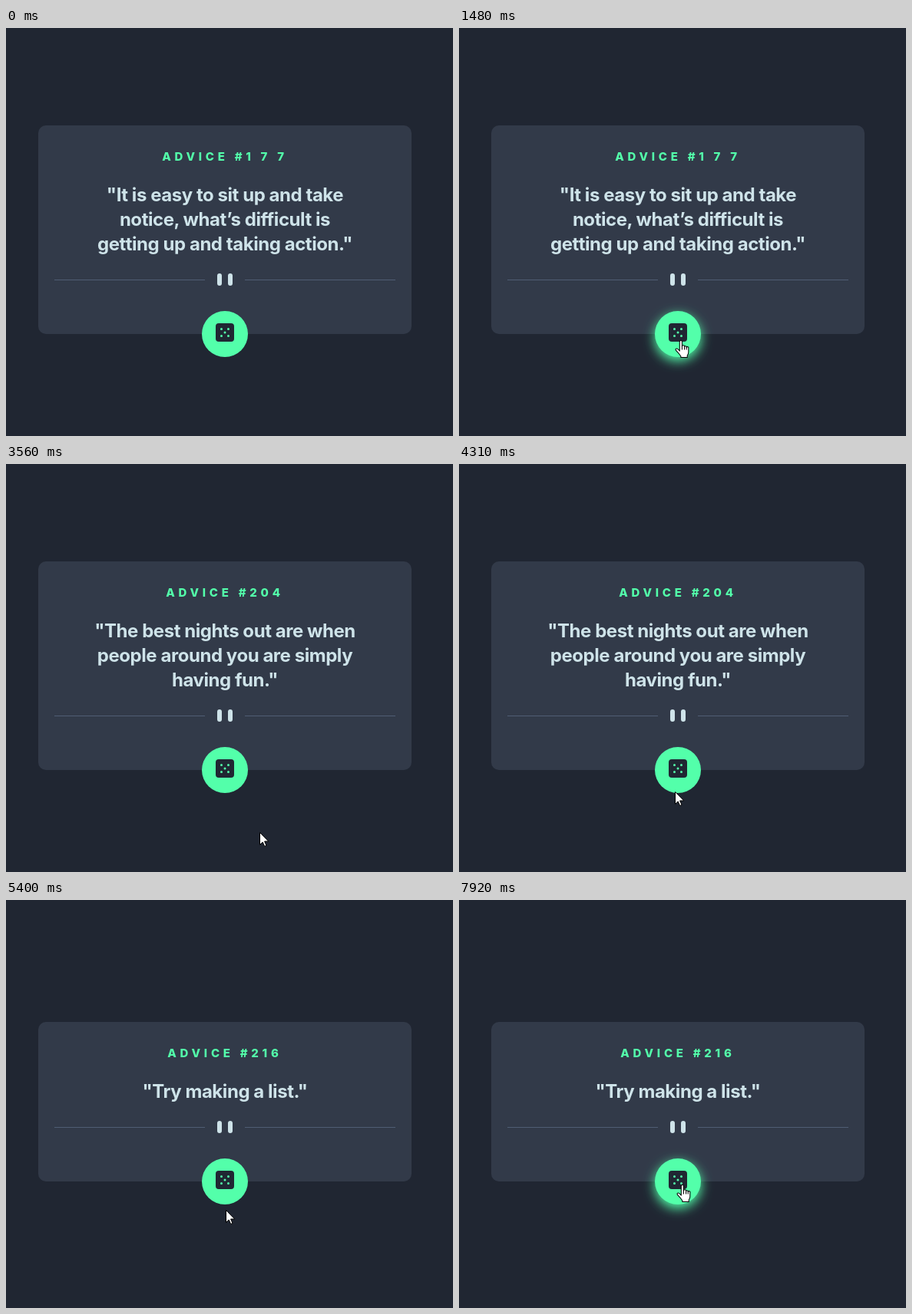
An HTML page for the animation above (8000 ms loop, 582 by 532 pixels).

```html
<!DOCTYPE html>
<html lang="en">
<head>
<meta charset="utf-8">
<title>Advice card</title>
<style>
  html, body { margin: 0; width: 100%; height: 100%; overflow: hidden; background: #202632; }
  svg { display: block; width: 582px; height: 532px; }
  text { font-family: Inter, sans-serif; text-anchor: middle; }
  #title { font-size: 15px; font-weight: 800; letter-spacing: 4.75px; fill: #53ffaa; }
  .quote { font-size: 24px; font-weight: 700; letter-spacing: -0.45px; fill: #cee3e9; }
  .cursor { fill: #fff; stroke: #000; stroke-linejoin: round; }
</style>
</head>
<body>
<svg viewBox="0 0 582 532">
  <defs>
    <filter id="blur" x="-50%" y="-50%" width="200%" height="200%">
      <feGaussianBlur stdDeviation="7.5"/>
    </filter>
  </defs>
  <rect width="582" height="532" fill="#202632"/>
  <rect id="card" x="42" width="486" rx="10" fill="#323a49"/>
  <g id="head">
    <text id="title" x="285" y="46"></text>
    <text class="quote" x="285" y="99"></text>
    <text class="quote" x="285" y="131"></text>
    <text class="quote" x="285" y="163"></text>
  </g>
  <g id="foot">
    <path d="M-222-70.5H-26M26-70.5H222" stroke="#4f5d74"/>
    <path d="M-7-76v10M7-76v10" stroke="#cee3e9" stroke-width="6" stroke-linecap="round"/>
    <circle id="glow" cy="5" r="30" fill="#53ffaa" filter="url(#blur)"/>
    <circle r="30" fill="#53ffaa"/>
    <rect x="-12" y="-14" width="24" height="24" rx="4" fill="#202733"/>
    <path d="M-4.5-6.5h0m9 0h0m-4.5 4.5h0m-4.5 4.5h0m9 0h0" stroke="#53ffaa" stroke-width="3" stroke-linecap="round"/>
  </g>
  <g id="pointer">
    <path id="arrow" class="cursor" transform="translate(-1)" d="M.5 .5V16.5L4.2 13 6.7 18.5 9 17.5 6.6 12H11.7Z"/>
    <g id="hand" class="cursor" transform="translate(-6.5) scale(1.05)">
      <path d="M5.5 13.5V2A1.5 1.5 0 0 1 8.5 2V7.5A1.5 1.3 0 0 1 11.5 8A1.4 1.2 0 0 1 14 9A1.3 1.2 0 0 1 16.5 10V15Q16.5 17 15 19V21.5H7V20Q5.5 18 4 16L1 12.8Q0 11.3 1.2 10.6Q2.5 10 4 11.7Z"/>
      <path d="M8.5 7V12M11.5 8V12M14 9V12" fill="none"/>
    </g>
    <circle id="click" r="12" fill="#ff0" fill-opacity=".47"/>
  </g>
</svg>
<script>
  const LOOP = 8000, STEP = 68;
  const $ = id => document.getElementById(id);
  const quoteLines = document.querySelectorAll('.quote');

  const advice = [
    { at: 0, no: '1 7 7', lines: ['"It is easy to sit up and take', 'notice, what’s difficult is', 'getting up and taking action."'] },
    { at: 2160, no: '204', lines: ['"The best nights out are when', 'people around you are simply', 'having fun."'] },
    { at: 5400, no: '216', lines: ['"Try making a list."'] }
  ];

  // Pointer moves in straight lines, sampled every STEP ms
  const entry = { x: 466, y: 538 };
  const moves = [
    { start: 120, end: 890, x: 288, y: 407 },
    { start: 2760, end: 2760, x: 297, y: 419 },
    { start: 2830, end: 2970, x: 327, y: 502 },
    { start: 3290, end: 3560, x: 332, y: 475 },
    { start: 3760, end: 4310, x: 282, y: 427 },
    { start: 4380, end: 4650, x: 287, y: 404 },
    { start: 5930, end: 6560, x: 325, y: 467 },
    { start: 7160, end: 7920, x: 290, y: 371 }
  ];
  const clicks = [{ start: 1350, end: 1480 }, { start: 5120, end: 5180 }];

  const show = (el, on) => el.setAttribute('visibility', on ? 'visible' : 'hidden');
  const place = (el, x, y) => el.setAttribute('transform', `translate(${x} ${y})`);

  function pointerAt(t) {
    let { x, y } = entry;
    for (const m of moves.filter(m => m.start <= t)) {
      const steps = Math.round((m.end - m.start) / STEP) + 1;
      const p = Math.min(1, (Math.floor((t - m.start) / STEP) + 1) / steps);
      x += (m.x - x) * p;
      y += (m.y - y) * p;
    }
    return [Math.round(x), Math.round(y)];
  }

  let current;
  function setAdvice(item) {
    if (item === current) return;
    current = item;
    $('title').textContent = 'ADVICE #' + item.no;
    quoteLines.forEach((el, i) => el.textContent = item.lines[i] || '');
  }

  function draw(t) {
    const item = advice.filter(a => a.at <= t).pop();
    const height = 176 + 32 * item.lines.length;
    const top = 263 - height / 2, bottom = top + height;
    setAdvice(item);
    $('card').setAttribute('y', top);
    $('card').setAttribute('height', height);
    place($('head'), 0, top);
    place($('foot'), 285, bottom);

    const [x, y] = pointerAt(t);
    const hover = Math.hypot(x - 285, y - bottom) < 28;
    place($('pointer'), x, y);
    show($('glow'), hover);
    show($('hand'), hover);
    show($('arrow'), t >= moves[0].start && !hover);
    show($('click'), clicks.some(c => t >= c.start && t < c.end));
  }

  const begin = performance.now();
  function tick() {
    draw((performance.now() - begin) % LOOP);
    requestAnimationFrame(tick);
  }
  tick();
</script>
</body>
</html>
```
